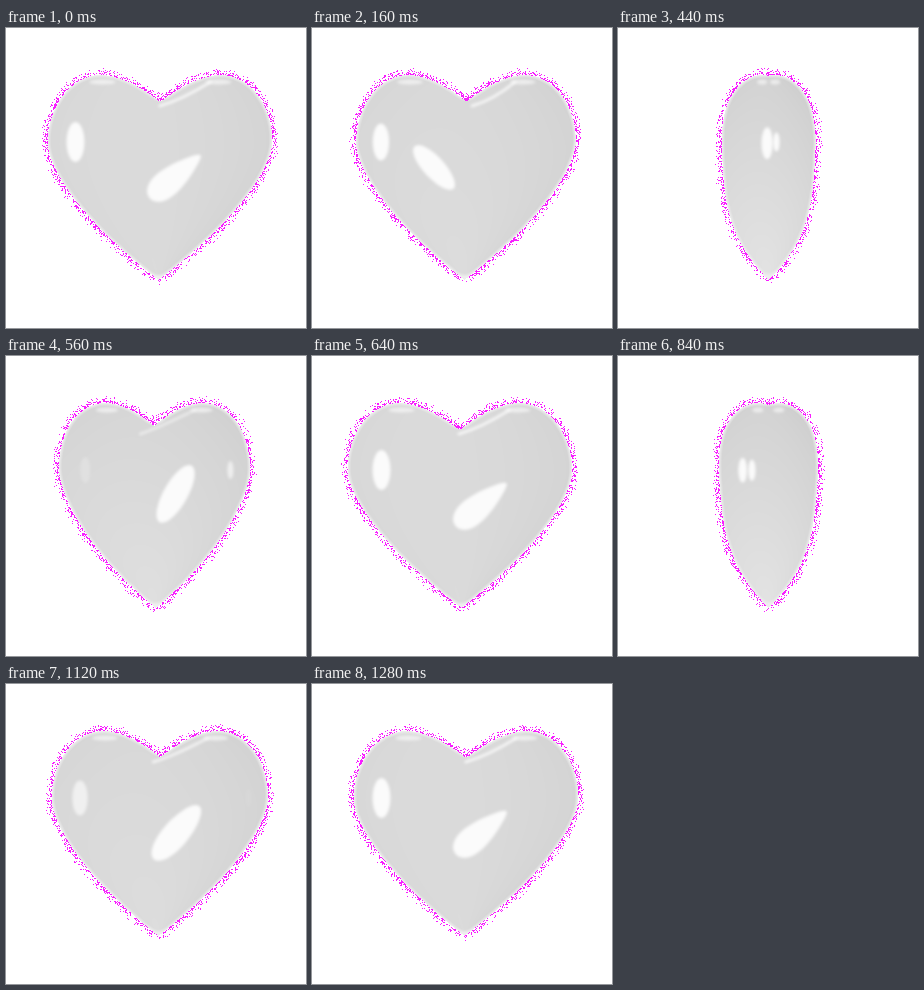
Animation, 300 px wide and 300 px high, one loop 1320 ms. Source, as an HTML page with a canvas:

```html
<!DOCTYPE html>
<html lang="en">
<head>
<meta charset="utf-8">
<title>Turning heart</title>
<style>
  html, body { margin: 0; width: 100%; height: 100%; overflow: hidden; background: #fff; }
  canvas { display: block; width: 300px; height: 300px; }
</style>
</head>
<body>
<canvas id="stage" width="300" height="300"></canvas>
<script>
const SIZE = 300, STEP = 40, COUNT = 33;
const TOP = 47, NOTCH = 73, TIP = 252;

// Where a reflection sits sideways as the heart turns: degrees, x
const SLIDE = [
  [-45, 82], [10, 66], [80, 125], [96, 149], [150, 172],
  [178, 169], [193, 122], [260, 134], [313, 213], [345, 245]
];

const clamp = (v, lo = 0, hi = 1) => Math.min(hi, Math.max(lo, v));
const smooth = t => t * t * (3 - 2 * t);
const swell = (v, mid, spread) => Math.exp(-(((v - mid) / spread) ** 2));

function along(points, key) {
  let i = 1;
  while (i < points.length - 1 && points[i][0] < key) i++;
  const [k0, v0] = points[i - 1], [k1, v1] = points[i];
  return v0 + (v1 - v0) * (key - k0) / (k1 - k0);
}

function layer() {
  const c = document.createElement('canvas');
  c.width = c.height = SIZE;
  return c.getContext('2d', { willReadFrequently: true });
}

function random(seed) {
  return () => {
    seed = (seed + 0x6D2B79F5) | 0;
    let t = Math.imul(seed ^ (seed >>> 15), 1 | seed);
    t = (t + Math.imul(t ^ (t >>> 7), 61 | t)) ^ t;
    return ((t ^ (t >>> 14)) >>> 0) / 4294967296;
  };
}

const arch = t => Math.sqrt(Math.max(0, 1 - t * t));

// Half width, seen from the front
function halfWidth(y) {
  return y < 115
    ? 60 + 52.5 * arch((115 - y) / (115 - TOP))
    : 112.5 * (1 - Math.pow((y - 115) / (TIP - 115), 1.57));
}

// Half depth, seen from the side
function halfDepth(y) {
  return y < 120
    ? 44.5 * arch((120 - y) / (120 - TOP))
    : 44.5 * (1 - Math.pow((y - 120) / (TIP - 120), 3));
}

// Distance of each lobe from the middle
function lobeShift(y) {
  return y < NOTCH ? 60 - (y - TOP) / 3 : 51 * clamp(1 - (y - NOTCH) / 90) ** 2;
}

function axis(y, cos) {
  return 151 + cos * (3.7 - 2.2 * (y - TOP) / (TIP - TOP));
}

// Each row is a pair of elliptic sections that merge below the notch.
function rowSpans(y, cos, sin) {
  const lobe = lobeShift(y);
  const half = Math.hypot(Math.max(0, halfWidth(y) - lobe) * cos, halfDepth(y) * sin);
  const mid = axis(y, cos), shift = lobe * Math.abs(cos);
  return [[mid - shift - half, mid - shift + half], [mid + shift - half, mid + shift + half]];
}

function drawGlint(ctx, turn) {
  if (turn < -45 || turn > 345) return;
  const enter = swell(turn, 0, 35), face = swell(turn, 163, 58);
  const len = 9 + 11 * enter + 26 * face;
  const wide = 3 + 6 * enter + 10 * face;
  const taper = 0.5 * swell(turn, 176, 10);
  const tilt = 90 + 50 * clamp((turn - 96) / 82) + 130 * clamp((turn - 178) / 23);

  ctx.save();
  ctx.translate(along(SLIDE, turn), 114 + 36 * swell(turn, 170, 40));
  ctx.rotate(tilt * Math.PI / 180);
  ctx.globalAlpha = 0.9 * clamp((turn + 45) / 40) * clamp((345 - turn) / 30);
  ctx.beginPath();
  for (let i = 0; i < 40; i++) {
    const a = i * Math.PI / 20, c = Math.cos(a);
    ctx.lineTo(len * c, wide * Math.sin(a) * (1 + taper * c));
  }
  ctx.fill();
  ctx.restore();
}

function drawRidges(ctx, cos, sin) {
  const c = Math.abs(cos), s = cos < 0 ? -sin : sin;
  const mid = axis(NOTCH, cos), x = mid + 24 * s;
  ctx.globalAlpha = 0.9 * c * c;
  ctx.lineWidth = 2.5;
  ctx.beginPath();
  ctx.moveTo(x, 78);
  ctx.quadraticCurveTo(x + 22 * c, 72, mid + 50 * c, 54);
  ctx.stroke();
  ctx.globalAlpha = 0.6;
  for (const side of [-1, 1]) {
    ctx.beginPath();
    ctx.ellipse(mid + side * 58 * c, 54, 4 + 9 * c, 2.5, 0, 0, 7);
    ctx.fill();
  }
}

function render(n) {
  const turn = 360 * smooth(n / (COUNT - 1)) - 2;
  const cos = Math.cos(turn * Math.PI / 180), sin = Math.sin(turn * Math.PI / 180);
  const shape = layer(), soft = layer(), out = layer();
  const rows = [];

  for (let y = TOP; y < TIP; y++) {
    rows[y] = rowSpans(y + 0.5, cos, sin);
    for (const [l, r] of rows[y]) {
      const from = Math.round(l);
      shape.fillRect(from, y, Math.round(r) - from, 1);
    }
  }
  soft.filter = 'blur(5.5px)';
  soft.drawImage(shape.canvas, 0, 0);

  const blur = soft.getImageData(0, 0, SIZE, SIZE).data;
  const body = shape.getImageData(0, 0, SIZE, SIZE);
  const glow = out.createImageData(SIZE, SIZE);
  const rand = random(71 + n % (COUNT - 1));

  for (let i = 0; i < blur.length; i += 4) {
    const p = i / 4, x = p % SIZE, y = (p - x) / SIZE;
    const near = blur[i + 3] / 255;
    if (body.data[i + 3]) {
      const [[l], [, r]] = rows[y];
      const u = clamp((2 * x - l - r) / (r - l || 1), -1, 1);
      const base = 218 + 8 * Math.abs(sin) * (y - 140) / 100 - 4 * u * u - 2 * u;
      const rim = clamp((0.72 - near) / 0.22);
      const v = base + (238 - base) * rim;
      body.data.set([v, v, v, 255], i);
    }
    const dot = rand() < (near - 0.07) * 1.3;
    glow.data.set(dot ? [248, 30, 255, 255] : [255, 255, 255, 255], i);
  }
  shape.putImageData(body, 0, 0);

  shape.globalCompositeOperation = 'source-atop';
  shape.fillStyle = shape.strokeStyle = '#fff';
  shape.lineCap = 'round';
  shape.filter = 'blur(1.5px)';
  drawRidges(shape, cos, sin);
  for (const offset of [-360, -180, 0, 180]) drawGlint(shape, turn + offset);

  out.putImageData(glow, 0, 0);
  out.drawImage(shape.canvas, 0, 0);
  return out.canvas;
}

const stage = document.getElementById('stage').getContext('2d');
const poses = Array.from({ length: COUNT }, (_, n) => render(n));
const start = performance.now();
let shown = -1;

function tick() {
  const n = Math.floor(Math.max(0, performance.now() - start) / STEP) % COUNT;
  if (n !== shown) stage.drawImage(poses[shown = n], 0, 0);
  requestAnimationFrame(tick);
}
tick();
</script>
</body>
</html>
```
